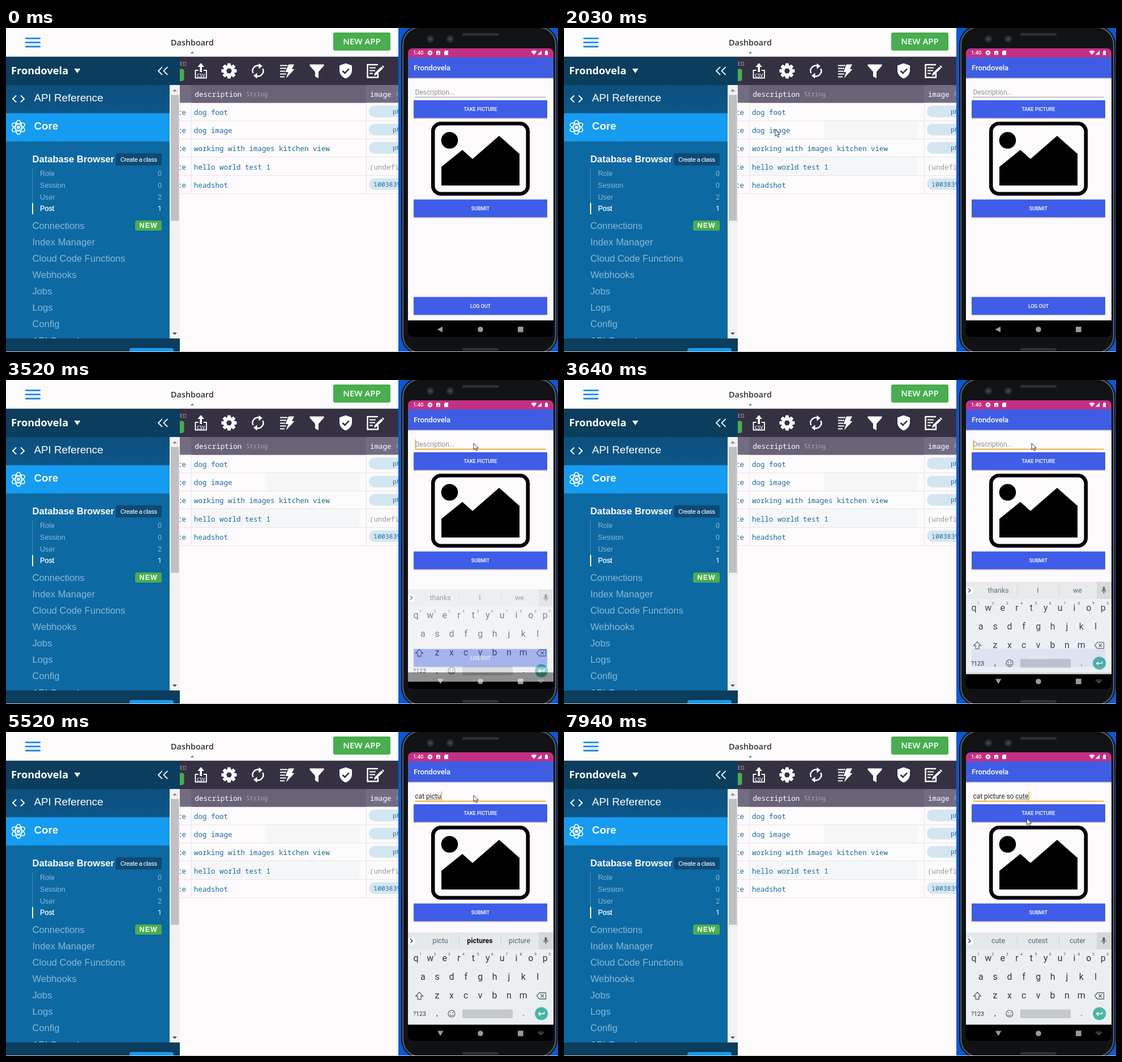
An HTML page for the animation above (8000 ms loop, 975x574 px).

```html
<!DOCTYPE html>
<html lang="en">
<head>
<meta charset="utf-8">
<title>Dashboard and phone</title>
<style>
html, body { margin: 0; width: 100%; height: 100%; overflow: hidden; background: #fcfafb; }
svg { display: block; width: 975px; height: 574px; }
text { white-space: pre; }
.ar { font-family: "Liberation Sans", Arial, sans-serif; }
.os { font-family: "Open Sans", sans-serif; }
.ro { font-family: Roboto, sans-serif; }
.mo { font-family: "Noto Sans Mono", monospace; }
</style>
</head>
<body>
<svg id="stage" viewBox="0 0 975 574" xmlns="http://www.w3.org/2000/svg"></svg>
<script>
const LOOP = 8000;
const APP = 'Frondovela';
const BLUE = '#3f5de6';
const ORANGE = '#f3a534';

const rect = (x, y, w, h, fill, more = '') =>
  `<rect x="${x}" y="${y}" width="${w}" height="${h}" fill="${fill}" ${more}/>`;
const text = (x, y, s, size, fill, cls, more = '') =>
  `<text x="${x}" y="${y}" font-size="${size}" fill="${fill}" class="${cls}" ${more}>${s}</text>`;
const shape = (d, fill, more = '') => `<path d="${d}" fill="${fill}" ${more}/>`;
const line = (d, stroke, w, more = '') =>
  `<path d="${d}" fill="none" stroke="${stroke}" stroke-width="${w}" ${more}/>`;
const dot = (x, y, r, fill, more = '') => `<circle cx="${x}" cy="${y}" r="${r}" fill="${fill}" ${more}/>`;
const group = (id, body, more = '') => `<g id="${id}" ${more}>${body}</g>`;
const MID = ' text-anchor="middle"', END = ' text-anchor="end"';
const BOLD = 'font-weight="700"', SEMI = 'font-weight="600"', MEDIUM = 'font-weight="500"';

function gear(cx, cy, r, hole, back) {
  let s = dot(cx, cy, r * 0.76, '#fff');
  for (let a = 0; a < 360; a += 45)
    s += rect(cx - r * 0.23, cy - r, r * 0.46, r * 0.5, '#fff', `rx="${r * 0.1}" transform="rotate(${a} ${cx} ${cy})"`);
  return s + dot(cx, cy, hole, back);
}

function topBar() {
  let s = rect(0, 0, 693, 51, '#fdfbfc') + rect(0, 50, 693, 1, '#d5d3d6');
  for (const y of [17, 24.3, 31.6]) s += rect(34, y, 27, 2.8, '#1f8ae4', 'rx="1"');
  return s + text(329, 30.5, 'Dashboard', 14.4, '#333238', 'os', SEMI + MID) +
    shape('M326 45L329 41.5L332 45Z', '#1f8ae4') +
    rect(578, 8, 101, 32, '#48ae4e', 'rx="3"') +
    text(628.5, 29, 'NEW APP', 15, '#fff', 'os', SEMI + MID);
}

function toolIcons() {
  const W = '#fff', round = 'stroke-linecap="round" stroke-linejoin="round"';
  let s = line('M339 75H334.5V88.5H354V75H349.5', W, 1.8, round) +
    shape('M344.2 62L350 69H346V78H342.4V69H338.4Z', W) +
    text(344.3, 86.5, 'CSV', 8, W, 'os', SEMI + MID);
  s += gear(394, 76, 13.5, 4.6, '#353143');
  s += line('M436.5 80A9.3 9.3 0 0 1 448 67.2M453.5 72A9.3 9.3 0 0 1 442 84.8', W, 2.4) +
    shape('M446.5 62.5L453 67.5L446.5 72.5Z', W) + shape('M443.5 79.5L437 84.5L443.5 89.5Z', W);
  s += line('M484 66.5H497M484 71.5H495M484 76.5H493M484 81.5H495M484 86.5H492', W, 2.2) +
    shape('M499 64.5H509L505 73H509.5L494.5 89L498.5 78H493.5Z', W);
  s += shape('M536.5 64.5H561.5V67L552 77.5V89L546 86V77.5L536.5 67Z', W);
  s += shape('M600 62.5L611 66.5V75C611 82 606 87 600 89.5C594 87 589 82 589 75V66.5Z', W) +
    line('M594.5 76L598.5 80L606 72.3', '#353143', 2.6);
  s += line('M657 80V87.5H638.5V65H657', W, 2.4) +
    line('M642 70.5H653M642 75.5H652M642 80.5H648', W, 2) +
    line('M653 81L664.5 70', W, 4) + shape('M650 84.5L651.2 79.5L655 83Z', W) +
    line('M665.2 69.3L666.8 67.8', W, 4);
  return s;
}

function table() {
  const ink = '#1f6da2', tint = '#f4f6f7';
  const rows = ['dog foot', 'dog image', 'working with images kitchen view', 'hello world test 1', 'headshot'];
  let s = rect(307, 101, 386, 31.5, '#726d83') + rect(327, 101, 309, 31.5, '#686378') +
    text(333.5, 121.5, 'description', 12.55, '#fff', 'mo', MEDIUM) +
    text(424, 121, 'String', 10.6, '#aaa5b3', 'mo') +
    text(643, 121.5, 'image', 12.55, '#fff', 'mo', MEDIUM) +
    text(689, 121, 'File', 10.6, '#aaa5b3', 'mo');
  s += group('patchA', rect(470, 165, 154, 31, tint) + rect(470, 229, 154, 32, tint));
  s += group('patchB', rect(460, 165, 10, 31, tint) + rect(328, 229, 142, 32, tint));
  rows.forEach((name, i) => {
    const y = 154 + i * 32.2;
    s += text(318, y, 'te', 12.5, ink, 'mo', END) + text(332, y, name, 12.5, ink, 'mo') +
      rect(307, Math.round(164 + i * 32.2), 386, 1, '#e6e4e8');
    if (i === 3) s += text(642, y, '(undefined)', 12.5, '#98989f', 'mo');
    else s += rect(641, y - 16.5, 80, 20.5, '#d4e6f2', 'rx="10"') +
      text(i < 4 ? 683 : 649, y - 2, i < 4 ? 'photo' : '1003839', 11.5, ink, 'mo');
  });
  return s + rect(327, 132, 1, 161, '#e6e4e8') + rect(636, 132, 1, 161, '#e6e4e8');
}

function panel() {
  return rect(307, 51, 386, 50, '#353143') +
    text(307, 67, 'ED', 8.5, '#b9b6c2', 'os', 'letter-spacing=".8"') +
    rect(290, 72.5, 24.5, 21.5, '#48ae4e', 'rx="4"') +
    group('hover', rect(425, 56.5, 39, 39, '#5f5c6b', 'rx="4"')) + toolIcons() + table();
}

function sidebar() {
  const pale = '#8ab9d6';
  let s = rect(0, 51, 307, 523, '#0b3d5d') + rect(0, 101, 289, 50, 'url(#api)') +
    rect(0, 151, 289, 50, '#159bf0') + rect(0, 201, 289, 349, '#0c69a2');
  s += text(9, 81.5, APP, 18.2, '#fff', 'os', BOLD) + shape('M120.5 72H131.5L126 80Z', '#fff') +
    line('M276 69L269 76L276 83M285.5 69L278.5 76L285.5 83', '#e4edf2', 2);
  s += line('M18 119.5L12 125.5L18 131.5M26 119.5L32 125.5L26 131.5', '#fff', 2) +
    text(49.5, 130, 'API Reference', 18.8, '#fff', 'ar') + text(49.5, 180, 'Core', 18.8, '#fff', 'ar', BOLD);
  for (const a of [30, 90, 150])
    s += `<ellipse cx="22" cy="176" rx="12.5" ry="5.4" fill="none" stroke="#fff" stroke-width="1.6" transform="rotate(${a} 22 176)"/>`;
  s += dot(22, 176, 2.8, '#fff');
  s += text(46.5, 238, 'Database Browser', 16.6, '#fff', 'ar', BOLD) +
    rect(194, 222, 81, 21.5, '#0b4a74', 'rx="3"') +
    text(202, 237.3, 'Create a class', 11.5, '#fff', 'ro', 'letter-spacing="-.55"');
  s += rect(46, 248, 1, 62, '#3f8aba') + rect(46, 310, 2, 20, '#fff');
  [['Role', 0], ['Session', 0], ['User', 2], ['Post', 1]].forEach(([name, n], i) => {
    const y = 262 + i * 20.8, c = i === 3 ? '#fff' : pale;
    s += text(60, y, name, 12.6, c, 'ar', i === 3 ? 'stroke="#fff" stroke-width=".3"' : '') +
      text(275, y, n, 12.6, c, 'ro', END);
  });
  const items = ['Connections', 'Index Manager', 'Cloud Code Functions', 'Webhooks', 'Jobs', 'Logs', 'Config', 'API Console'];
  s += `<g clip-path="url(#menu)">` +
    items.map((t, i) => text(46.5, 355.5 + i * 29.15, t, 16.6, pale, 'ar')).join('') + '</g>';
  s += rect(228, 341, 47, 18, '#48ae4e', 'rx="3"') +
    text(251.7, 354.3, 'NEW', 12.5, '#fff', 'ar', BOLD + ' letter-spacing="1"' + MID);
  s += rect(289, 101, 18, 449, '#f3f1f3') + rect(291, 118.5, 14.5, 223, '#c1c0c2') +
    shape('M294 112.5L298 108L302 112.5Z', '#8d8d90') + shape('M294 539.5H302L298 543.5Z', '#444');
  return s + rect(218, 567, 78, 12, '#159bf0', 'rx="4"');
}

const button = (y, label) =>
  rect(720, y + 1, 236, 32, '#cfcfd8', 'rx="1"') + rect(720, y, 236, 31.5, BLUE, 'rx="1"') +
  text(838, y + 19, label, 8.9, '#fff', 'ro', MEDIUM + MID);

function body() {
  let s = rect(693, 0, 282, 574, '#0a58d2') +
    rect(698, -4.5, 276, 583, '#0b0c0e', 'rx="34"') +
    rect(701, -1.5, 270, 577, '#111214', 'rx="31" stroke="#53565b" stroke-width="2.5"');
  for (const x of [749.5, 784.5]) s += dot(x, 19.5, 6.5, '#2b2c2e') + dot(x, 19.5, 2.6, '#45464a');
  return s + rect(806, 9, 64, 5, '#2c2e31', 'rx="2"') + rect(806, 567, 64, 5, '#2c2e31', 'rx="2"');
}

function phone() {
  let s = body() + '<g clip-path="url(#screen)">' + rect(710, 36, 257, 511, '#000') + rect(710, 52, 257, 466, '#fcfafb') +
    rect(710, 36, 257, 16, '#c43083') + rect(710, 88, 257, 2, '#d5d4dd') + rect(710, 52, 257, 36.5, '#3f5de2');
  s += text(719, 47.3, '1:40', 9.3, '#fff', 'ro', MEDIUM) + gear(749, 44, 4.5, 1.4, '#c43083') +
    rect(760, 40.5, 7, 7, '#fff', 'rx="1"') + text(763.5, 46.5, 'A', 6, '#c43083', 'ro', BOLD + MID) +
    shape('M776 40H781V48H774V42Z', '#fff') +
    shape('M927.5 41.5Q932.5 38 937.5 41.5L932.5 47.5Z', '#fff') + shape('M946 40V47.5H938.5Z', '#fff') +
    rect(952, 41, 5, 7, '#fff') + rect(953.3, 39.8, 2.4, 2, '#fff');
  s += text(720, 75, APP, 13.2, '#fff', 'ro', MEDIUM);
  s += group('hint', text(722.5, 118, 'Description...', 11.9, '#939297', 'ro')) +
    text(722.5, 118, '', 11.9, '#29292c', 'ro', 'id="typed"') +
    rect(722.5, 119.3, 0, 0.8, '#77777c', 'id="mark"') +
    rect(722.5, 122, 231, 1, '#98979c', 'id="rule"') +
    rect(723, 105.5, 1.5, 16, ORANGE, 'id="caret"');
  s += button(128, 'TAKE PICTURE') + button(303.7, 'SUBMIT') + button(476.5, 'LOG OUT');
  s += rect(754.2, 169.2, 167.6, 124.6, 'none', 'rx="14" stroke="#000" stroke-width="6.6"') +
    dot(783.5, 199, 14.8, '#000') + shape('M769 246L806 216L824 232L871 191L907 223V279H769Z', '#000');
  s += group('navUp', shape('M771 529V539L761.5 534Z', '#9a9a9c')) +
    group('navDown', shape('M762 529.5H772.5L767.2 538.5Z', '#9a9a9c') +
      line('M939.5 531.3H949.5M939.5 533.3H949.5', '#8a8a8c', 1.2, 'stroke-dasharray="1.3 .9"') +
      line('M942 535.3H947', '#8a8a8c', 1.2)) +
    dot(838, 534, 4.8, '#9a9a9c') + rect(904, 529.2, 9.6, 9.6, '#9a9a9c');
  return s + keyboard() + '</g>';
}

function keyboard() {
  const ink = '#2e3940', soft = '#58636a';
  let s = rect(710, 355, 257, 163.5, '#ebeff1') + rect(710, 355, 257, 30, '#e6e9eb') +
    rect(941, 355, 26, 30, '#d3d8da') + dot(716, 370, 7, '#fff') +
    line('M714.3 366.5L717.8 370L714.3 373.5', '#333', 1.5) +
    rect(800, 361, 1, 18, '#cdd2d5') + rect(874, 361, 1, 18, '#cdd2d5');
  [767, 837, 907].forEach((x, i) => s += text(x, 374.3, '', 12.4, soft, 'ro', `id="tip${i}"` + MID));
  s += rect(951.5, 363.5, 4, 8, soft, 'rx="2"') + line('M949.7 369A3.8 3.8 0 0 0 957.3 369M953.5 373V376', soft, 1.2);
  [['qwertyuiop', 724], ['asdfghjkl', 736.3], ['zxcvbnm', 761.5]].forEach(([keys, x0], r) =>
    [...keys].forEach((k, i) => {
      const x = x0 + i * 25.36;
      s += text(x, 406 + r * 33, k, 16, ink, 'ro', MID);
      if (!r) s += text(x + 8, 395.5, (i + 1) % 10, 7, soft, 'ro', MID);
    }));
  s += line('M730 461L736.5 468H733V473.5H727V468H723.5Z', soft, 1.3) +
    line('M937.5 467.5L942 462H953.5V473H942ZM944.5 464.8L950 470.3M950 464.8L944.5 470.3', soft, 1.3);
  s += text(719, 503, '?123', 10.6, ink, 'ro') + text(761.5, 503, ',', 14, ink, 'ro', MID) +
    text(914, 503, '.', 14, ink, 'ro', MID) +
    dot(787, 499, 6, 'none', `stroke="${soft}" stroke-width="1.2"`) + dot(784.8, 497.3, 0.9, soft) +
    dot(789.2, 497.3, 0.9, soft) + line('M783.7 500.5Q787 504.5 790.3 500.5', soft, 1.1) +
    rect(806, 491.5, 89, 15.5, '#c4c9cc', 'rx="2"') + dot(945.7, 499, 11.5, '#48b5a6') +
    line('M950.5 495.5V499.3H941M944 496L940.7 499.3L944 502.6', '#fff', 1.5);
  return group('keys', s);
}

const defs = `<defs>
<linearGradient id="api" x2="0" y2="1"><stop stop-color="#0c4f7c"/><stop offset="1" stop-color="#0c5688"/></linearGradient>
<clipPath id="menu"><rect x="0" y="201" width="289" height="349"/></clipPath>
<clipPath id="left"><rect x="0" y="0" width="693" height="574"/></clipPath>
<clipPath id="screen"><rect x="710" y="36" width="257" height="511" rx="8"/></clipPath></defs>`;

const stage = document.getElementById('stage');
stage.innerHTML = defs + rect(0, 0, 975, 574, '#fcfafb') +
  `<g clip-path="url(#left)">${topBar()}${panel()}${sidebar()}</g>` + phone() +
  rect(0, 573, 975, 1, '#c9c9cc') +
  group('mouse', shape('M0 0V11.6L2.7 9.2L4.6 13.4L6.5 12.5L4.6 8.5H8.2Z', '#fff', 'stroke="#222" stroke-width=".9"'));

// pointer stops: time, x, y
const path = [
  [1040, 612, 300], [1160, 545, 195], [1280, 446, 82], [1400, 416, 66], [1550, 452, 140],
  [1670, 507, 225], [1790, 470, 268], [1910, 410, 240], [2030, 373, 180], [2150, 364, 131],
  [2300, 403, 131], [2450, 560, 145], [2570, 735, 152], [2690, 837.5, 139.5], [2860, 845, 132],
  [2980, 838, 120], [3100, 826, 112], [7660, 825, 124], [7790, 819.5, 139], [7940, 817.5, 153]
];
// typing: time, text, suggestions
const typing = [
  [0, '', 'thanks I we'], [4440, 'c', 'c can I'], [4560, 'ca', 'ca can call'],
  [4710, 'cat', 'cat cats catch'], [4830, 'cat ', 'is and in'], [4980, 'cat p', 'p please pm'],
  [5130, 'cat pi', 'pi pick pics'], [5250, 'cat pic', 'pic pics pick'], [5400, 'cat pict', 'pict picture pictures'],
  [5520, 'cat pictu', 'pictu *pictures picture'], [5670, 'cat picture', 'picture pictures pictured'],
  [5790, 'cat picture ', 'of is and'], [6070, 'cat picture so', 'so some soon'],
  [6220, 'cat picture so ', 'I much far'], [6480, 'cat picture so c', 'c can I'],
  [6600, 'cat picture so cut', 'cut cute cutting'], [6730, 'cat picture so cute', 'cute cutest cuter']
];
// keyboard entry: time, offset, opacity
const slide = [[0, 170, 0], [3400, 60, 0.15], [3520, 16, 0.6], [3640, 2.7, 0.92], [3760, 0.5, 1], [3880, 0, 1]];

const at = (list, t) => list.filter(e => e[0] <= t).pop();
const el = id => document.getElementById(id);
const set = (id, attrs) => { for (const k in attrs) el(id).setAttribute(k, attrs[k]); };
const show = (id, on) => set(id, { visibility: on ? 'visible' : 'hidden' });

function width(s) {
  el('typed').textContent = s;
  return s ? el('typed').getComputedTextLength() : 0;
}

function draw(t) {
  const p = at(path, t);
  show('mouse', p);
  if (p) set('mouse', { transform: `translate(${p[1]} ${p[2]})` });
  show('hover', t >= 1280 && t < 1550);
  show('patchA', t >= 1280);
  show('patchB', t >= 1910);

  const [, dy, alpha] = at(slide, t), focus = t >= 3400;
  set('keys', { transform: `translate(0 ${dy})`, opacity: alpha });
  show('navUp', t < 3520);
  show('navDown', t >= 3520);
  set('rule', focus ? { fill: ORANGE, y: 121.7, height: 1.8 } : { fill: '#98979c', y: 122, height: 1 });

  const [, typed, tips] = at(typing, t);
  const start = width(typed.slice(0, typed.lastIndexOf(' ') + 1)), end = width(typed);
  set('mark', { x: 722.5 + start, width: Math.max(0, end - start) });
  set('caret', { x: 722.7 + end });
  show('caret', focus && !(t >= 7270 && t < 7790));
  show('hint', !typed);
  tips.split(' ').forEach((tip, i) => {
    const strong = tip[0] === '*';
    el('tip' + i).textContent = strong ? tip.slice(1) : tip;
    set('tip' + i, { 'font-weight': strong ? 700 : 400, fill: strong ? '#111' : '#58636a' });
  });
}

const begin = performance.now();
function tick() {
  draw((performance.now() - begin) % LOOP);
  requestAnimationFrame(tick);
}
tick();
</script>
</body>
</html>
```
